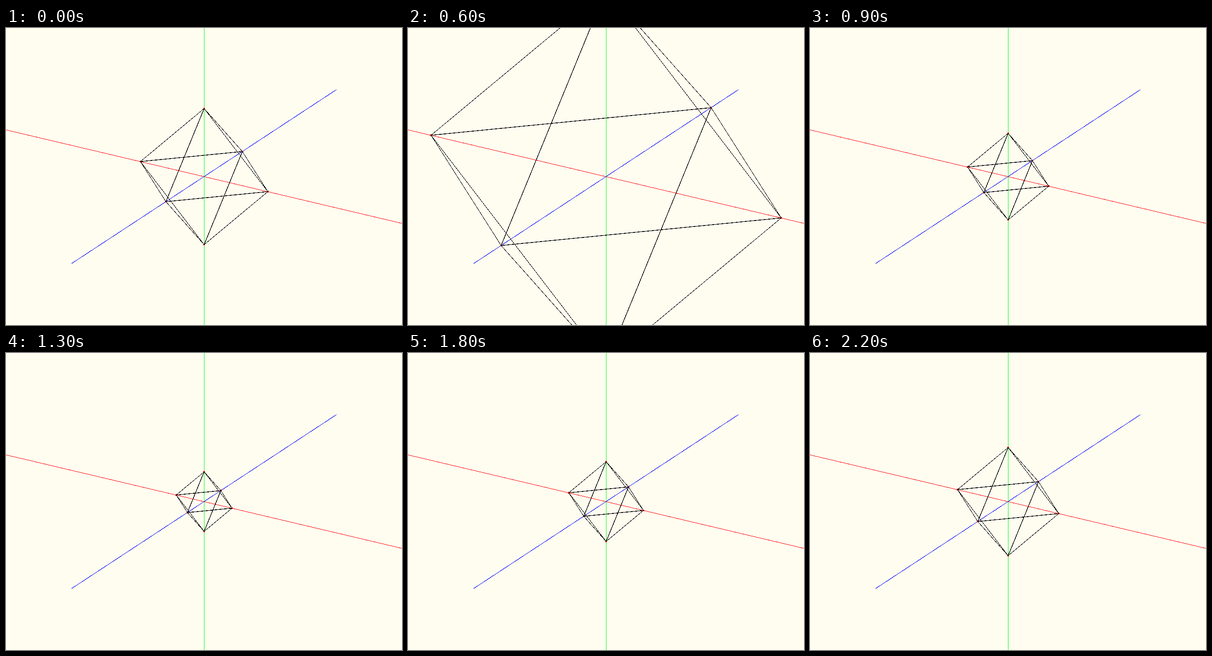
Animation, 864 px wide and 648 px high, one loop 4200 ms. Source, as an HTML page:

```html
<!DOCTYPE html>
<html lang="en">
<head>
<meta charset="utf-8">
<title>Octahedron zoom</title>
<style>
  html, body { margin: 0; width: 100%; height: 100%; overflow: hidden; background: #fffdf0; }
  svg { display: block; width: 864px; height: 648px; }
</style>
</head>
<body>
<svg viewBox="0 0 864 648" shape-rendering="crispEdges">
  <g stroke-width="1">
    <path d="M0 222.3L864 426.3" stroke="#f00"/>
    <path d="M432.5 0V648" stroke="#0f0"/>
    <path d="M143 514L721 134.5" stroke="#00f"/>
  </g>
  <g id="dots" fill="#f00"></g>
  <g id="edges" stroke="#000"></g>
</svg>
<script>
const LOOP = 4200;
const CENTER = [432.3, 324.2];

// Projected unit vertices; the other three are their mirror images.
const axes = { right: [0.9363, 0.2211], top: [0, -1], back: [0.5615, -0.3685] };
const mirror = ([x, y]) => [-x, -y];
const vertices = [
  axes.right, axes.top, axes.back,
  mirror(axes.right), mirror(axes.top), mirror(axes.back)
];
const heavyEdges = new Set(["2-3", "0-5", "1-5", "2-4"]);

// [start time, half height of the solid]
const zoomSteps = [
  [0, 148.5], [500, 171.5], [600, 408], [800, 230], [900, 94.5], [1300, 65],
  [1600, 70], [1700, 78], [1800, 87], [1900, 101], [2000, 114], [2200, 118]
];

function add(parent, tag, attrs) {
  const node = document.createElementNS("http://www.w3.org/2000/svg", tag);
  setAll(node, attrs);
  return document.getElementById(parent).appendChild(node);
}

function setAll(node, attrs) {
  for (const key in attrs) node.setAttribute(key, attrs[key]);
}

const dots = vertices.map(() => add("dots", "circle", { r: 2 }));
const edges = [];
for (let a = 0; a < 6; a++) {
  for (let b = a + 1; b < 6; b++) {
    if (b - a === 3) continue; // opposite corners are not joined
    const width = heavyEdges.has(`${a}-${b}`) ? 1.4 : 1;
    edges.push({ a, b, node: add("edges", "line", { "stroke-width": width }) });
  }
}

function draw(time) {
  const scale = zoomSteps.findLast(([start]) => start <= time)[1];
  const points = vertices.map(v => v.map((c, i) => CENTER[i] + c * scale));
  dots.forEach((dot, i) => setAll(dot, { cx: points[i][0], cy: points[i][1] }));
  for (const { a, b, node } of edges) {
    const [x1, y1] = points[a], [x2, y2] = points[b];
    setAll(node, { x1, y1, x2, y2 });
  }
}

const origin = performance.now();
function tick() {
  draw((performance.now() - origin) % LOOP);
  requestAnimationFrame(tick);
}
tick();
</script>
</body>
</html>
```
